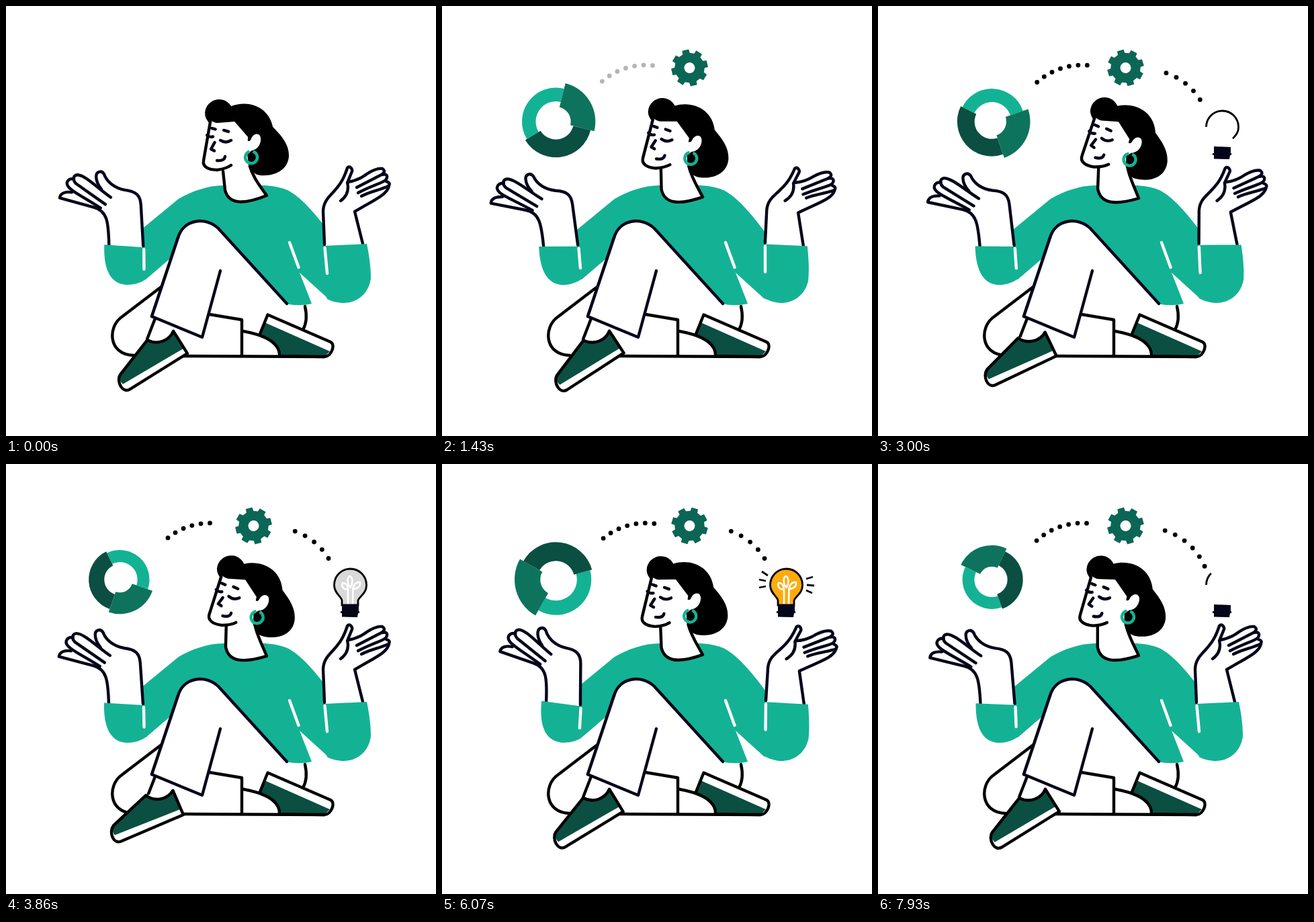
Animation of 640 by 640 pixels, one loop 8000 ms. Source, as an HTML page:

```html
<!DOCTYPE html>
<html lang="en">
<head>
<meta charset="utf-8">
<title>Balancing ideas</title>
<style>
  html, body { margin: 0; width: 100%; height: 100%; overflow: hidden; background: #fff; }
  svg { display: block; width: 100vw; height: 100vh; }
  .line { fill: none; stroke: #05051a; stroke-width: 4.4; stroke-linecap: round; stroke-linejoin: round; }
  .ink { stroke: #000; }
  .teal { fill: #14b294; }
  .deep { fill: #0a4f42; }
  .white { fill: #fff; }
  .crease { fill: none; stroke: #fff; stroke-width: 4.4; stroke-linecap: round; }
</style>
</head>
<body>
<svg viewBox="0 0 640 640">
  <!-- back leg, floor and far shoe -->
  <g class="line ink">
    <path d="M231 418 L172 463 C151 478 152 519 190 520"/>
    <path d="M264 521 L474 522"/>
    <path d="M303 459 L351 467 V520"/>
    <path d="M445 447 C448 460 447 473 442 482"/>
  </g>
  <path class="deep" d="M385 471 L482 514 L474 522 L407 521 C407 505 395 496 377 489 Z"/>
  <path class="line ink" d="M353 484 C375 488 408 497 407 521 M378 488 L389.500 459.500 L483 500 C491 504 484 522 474 522 L407 521"/>

  <!-- shirt -->
  <path class="teal" d="M257 287 C276 276 300 267 324 267 H385 C400 268 412 271 419 274 C442 286 464 314 484 341 L492 385 L480 436 L437 397 L455 443 C443 446 428 446 418 443 L316 331 L270 330 L243 377 L208 407 L180 400 L190 342 Z"/>
  <path class="crease" d="M422 352 L435.500 389"/>

  <!-- front leg -->
  <path class="line" style="fill:#fff" d="M217 462 L256 345 C264 317 297 313 316 331 L418 443"/>
  <path class="white" d="M217 462 L256 345 L319 394 L292 493 Z"/>
  <path class="line" d="M256 345 L217 462 L292 493 L319 394"/>
  <path class="line ink" d="M222 465 L210 496"/>
  <g id="shoe">
    <path class="white" d="M210 497 L169 548 C163 558 172 576 183 570 L269 518 L249 484 Z"/>
    <path class="deep" d="M210 497 L169 548 C167 553 169 559 173 562 L264 510 L249 484 C243 498 226 505 210 497 Z"/>
    <path class="line ink" d="M210 497 L169 548 C163 558 172 576 183 570 L269.500 517.500 L249 484 C243 498 226 505 210 497 Z"/>
  </g>

  <!-- arms -->
  <g id="leftArm">
    <path class="white" d="M204 359 L200 296 L180 275 L145 275 L138 303 L153 320 V359 Z"/>
    <g class="line">
      <path d="M204 357 L200 296 C199 281 192 276 176 274 C160 271 149 262 145 251 C141 244 133 247 133 254 C133 261 136 267 141 273"/>
      <path d="M155 285 C135 271 116 252 105 252 C98 253 98 260 103 265 L147 295.500"/>
      <path d="M100 258 C91 257 87 264 92 270 C97 277 110 282 140 301"/>
      <path d="M97 278 C88 277 80 279 79 286.500 L130 300 C150 305 152 322 153 356"/>
    </g>
    <path class="teal" d="M146 355.500 L205 359 L208 372 L209 406 C202 411 192 415 180 415 C157 414 145 395 146 355.500 Z"/>
    <path class="crease" d="M205 362 L205.500 391.500"/>
  </g>
  <g id="rightArm">
    <path class="white" d="M474 358 L472 306 L489 276 L520 270 L519 306 L531 357 Z"/>
    <g class="line">
      <path d="M474 355 L472 306 C472 291 481 284 488 276 C495 268 502 260 508 241 C511 237 516 242 515 246 L508 263 C511 275 506 284 498 290"/>
      <path d="M509 262 C521 260 528 257 537 250 C546 244 553 241 560 242 C566 246 562 250 553 254 L522 270"/>
      <path d="M560 251 C567 249 569 254 565 259 C561 263 545 267 524 278"/>
      <path d="M566 261 C573 263 572 268 564 270 C555 274 540 277 529 283"/>
      <path d="M570 268 C567 281 549 288 519 306 L531 354"/>
    </g>
    <path class="teal" d="M474 357 L537 354 C541 374 543 390 543 405 C540 430 520 443 500 442 C490 441 483 439 478 436 L470 415 Z"/>
    <path class="crease" d="M474.500 360 L478 398"/>
  </g>

  <!-- head -->
  <path id="neck" class="line ink" style="fill:#fff"/>
  <g id="head">
    <path d="M303 175 C300 171 296 167 296 160 C296 148 306 139 317 139 C325 139 331 143 335 149 C361 139 391 150 397 180 C411 194 421 206 421 223 C420 244 400 254 378 252 C372 251 369 249 367 245 L360 236 L358 225 L360 195 L340 172 Z"/>
    <path class="white" d="M304 170 C314 177 326 174 337 177 C348 180 350 193 357 199 C361 203 364 201 365 197 C369 188 380 188 379 200 C378 209 372 214 366 215 L359 220 L361 238 L335 237 C326 243 314 245 306 242 C297 241 292 237 294 230 Z"/>
    <g class="line">
      <path class="ink" d="M304 172 L294 230 C292 240 302 244 314 244 C322 243 329 241 335 237"/>
      <path d="M306 182 L311.500 183.500 M324 185 L331 187 M299 192.500 Q303 196 308 194.500 M319 200 Q327 205 335 200"/>
      <path d="M310.500 203 L305 213 L310 215.500 M314 230 Q325 231 326 224"/>
    </g>
    <path d="M367.500 216.500 A9 9 0 1 1 362.500 216.500" fill="none" stroke="#14b294" stroke-width="4.4"/>
  </g>

  <!-- floating things -->
  <g id="chart"></g>
  <g id="dots"></g>
  <path id="gear" fill="#0c6655" fill-rule="evenodd"/>
  <g id="bulb">
    <path id="glass" d="M488.500 180 A24 24 0 0 1 536.500 180 C537 192 526 197 524 203 V210 H500 V203 C499 197 488 192 488.500 180 Z"/>
    <g id="filament" fill="none" stroke="#fff" stroke-width="2.6" stroke-linecap="round">
      <path d="M512.500 184 C507 177 508 169 511.500 167 C516 168 517 177 512.500 184"/>
      <path d="M509 208 V187 C501 187 499 180 501 177 C506 177 509 181 509 187"/>
      <path d="M516 208 L516.500 186 C517 179 522 175 527 176 C528 182 523 186 516.500 186"/>
    </g>
    <path id="rim" pathLength="1" fill="none" stroke="#000" stroke-width="2.8" d="M488.500 180 A24 24 0 0 1 536.500 180 C537 192 526 197 524 203 V210 H500 V203 C499 197 488 192 488.500 180"/>
    <path id="cap" fill="#05051a" d="M500 209 L525 210 V219 H526 V222 H524 L523 228 L500 227.500 V222 H498 V219 H500 Z"/>
    <path id="rays" fill="none" stroke="#05051a" stroke-width="2.8" d="M476 160 L485 166 M472 172 L482 174 M472 184 L482 182 M542 171 L552 168 M543 180 L554 181 M542 188 L551 192"/>
  </g>
</svg>
<script>
const DURATION = 8;
const $ = id => document.getElementById(id);
const set = (el, attrs) => { for (const k in attrs) el.setAttribute(k, attrs[k]); };
const add = (parent, tag, attrs = {}) => {
  const el = parent.appendChild(document.createElementNS("http://www.w3.org/2000/svg", tag));
  set(el, attrs);
  return el;
};
const ramp = (t, a, b) => Math.min(1, Math.max(0, (t - a) / (b - a)));
const smooth = x => x * x * (3 - 2 * x);
const easeOut = x => 1 - (1 - x) ** 3;
const backOut = x => 1 + 2.7 * (x - 1) ** 3 + 1.7 * (x - 1) ** 2;
const wave = (t, peak, period) => Math.cos((t - peak) / period * 2 * Math.PI);
const fadeInOut = (t, start, end, time) => ramp(t, start, start + time) * (1 - ramp(t, end, end + time));
const polar = (cx, cy, r, deg) => {
  const a = deg * Math.PI / 180;
  return [cx + r * Math.cos(a), cy + r * Math.sin(a)];
};

function addSlice(from, to, inner, outer, fill) {
  const p = (r, deg) => polar(0, 0, r, deg);
  add($("chart"), "path", {
    fill,
    d: `M${p(outer, from)} A${outer} ${outer} 0 0 1 ${p(outer, to)} L${p(inner, to)} A${inner} ${inner} 0 0 0 ${p(inner, from)} Z`
  });
}
addSlice(225, 360, 27, 45.5, "#14b294");
addSlice(90, 225, 24, 48, "#0a4f42");
addSlice(0, 90, 20, 53, "#0e735c");

const corners = [];
for (let tooth = 0; tooth < 360; tooth += 45) {
  for (const side of [-1, 1]) {
    const base = polar(0, 0, 22.3, tooth + side * 14), tip = polar(0, 0, 27.5, tooth + side * 10.5);
    corners.push(...(side < 0 ? [base, tip] : [tip, base]));
  }
}
set($("gear"), { d: `M${corners.join("L")}Z M8 0 A8 8 0 1 0 -8 0 A8 8 0 1 0 8 0 Z` });

// Dots march along an arc and show only between two angles
function makeTrail(cx, cy, r, from, to, step, start, firstAngle) {
  const group = add($("dots"), "g");
  const dots = Array.from({ length: 8 }, () => add(group, "circle", { r: 3.4 }));
  return t => {
    const first = firstAngle(t);
    const lowest = first + Math.ceil((from - first) / step) * step;
    dots.forEach((dot, i) => {
      const angle = lowest + i * step, [x, y] = polar(cx, cy, r, angle);
      set(dot, { cx: x, cy: y, opacity: angle <= to ? 1 : 0 });
    });
    set(group, { opacity: ramp(t, start, start + .45) });
  };
}
const trails = [
  makeTrail(303.5, 187.7, 99.8, -133.7, -82.6, 7.75, 1.3, t => -128 + 4.2 * (t - 2.07) - .17 * (t - 2.07) ** 2),
  makeTrail(398, 190.6, 96.1, -74, -23, 9.75, 1.7, t => -72.4 + 2.4 * Math.sin(ramp(t, 2, 8) * Math.PI))
];

function drawBulb(t) {
  const shown = t < 5 ? smooth(ramp(t, 2.64, 3.3)) : 1 - ramp(t, 7.4, 8);
  const filled = fadeInOut(t, 3.1, 7.3, .3);
  const lit = ramp(t, 4.25, 4.4);
  set($("bulb"), { opacity: shown > 0 ? 1 : 0 });
  set($("rim"), { "stroke-dasharray": `${shown} 2` });
  set($("glass"), { fill: `rgb(${217 + 38 * lit},${217 - 46 * lit},${217 - 204 * lit})`, opacity: filled });
  set($("filament"), { opacity: filled });
  set($("cap"), { opacity: ramp(t, 2.64, 2.9) });
  set($("rays"), {
    opacity: fadeInOut(t, 4.3, 7.15, .2),
    transform: `translate(513 178) scale(${1.09 + .09 * wave(t, 4.79, 2.56)}) translate(-513 -178)`
  });
}

function drawHead(t) {
  const k = smooth(ramp(t, -.2, 2.3)) * (.76 + .3 * wave(t, 2.95, 6.6));
  set($("head"), { transform: `rotate(${8.2 * k} 347 290)` });
  set($("neck"), { d: `M${323 + 5 * k} ${246 - 5 * k} L${326 + k} ${274 - 2 * k} C331 294 351 297 388 ${282 + 4 * k} C${378 + 3 * k} 268 ${368 + 6 * k} 256 ${362 + 9 * k} ${236 + 4 * k}` });
}

function drawChart(t) {
  const late = t - 1.4;
  const turn = -100 + 23.25 * (late + Math.hypot(late, 1));
  const size = backOut(ramp(t, .1, 1.3)) * (1.06 - .1 * wave(t, 4.1, 4));
  set($("chart"), { transform: `translate(169.5 172) rotate(${turn}) scale(${Math.max(0, size)})` });
}

function draw(t) {
  set($("leftArm"), { transform: `rotate(${-4.3 * wave(t, 2.02, 7.5)} 184 384)` });
  set($("rightArm"), { transform: `rotate(${3 - 3 * wave(t, -.07, 4)} 505 431)` });
  set($("shoe"), { transform: `rotate(${2.8 + 5.4 * wave(t, 3.95, 6.2)} 235 481)` });
  set($("gear"), { transform: `translate(368.5 92) rotate(${55 * t - 2}) scale(${easeOut(ramp(t, .8, 1.35))})` });
  drawHead(t);
  drawChart(t);
  drawBulb(t);
  trails.forEach(drawTrail => drawTrail(t));
}

const start = performance.now();
function tick() {
  draw((performance.now() - start) / 1000 % DURATION);
  requestAnimationFrame(tick);
}
tick();
</script>
</body>
</html>
```
